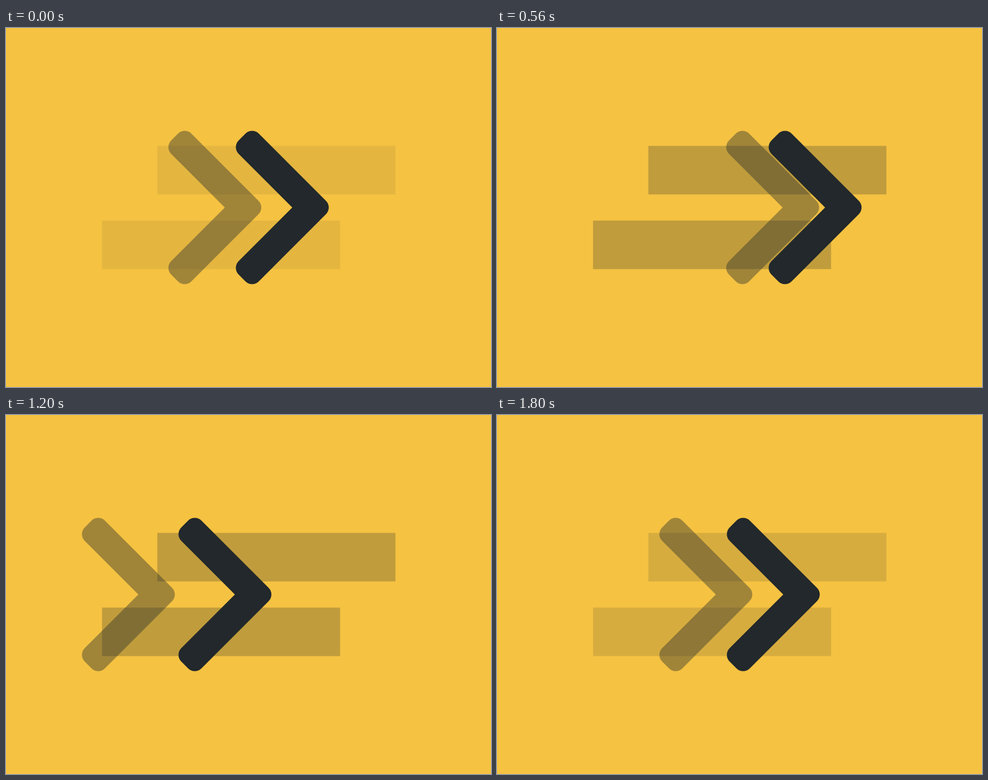
Recreate the animation shown at these times as an HTML page with a canvas. Size 870 by 644 pixels, loop 2 s.

```html
<!DOCTYPE html>
<html lang="en">
<head>
<meta charset="utf-8">
<title>Chevrons</title>
<style>
  html, body { margin: 0; width: 100%; height: 100%; overflow: hidden; background: #f5c242; }
  canvas { display: block; width: 870px; height: 644px; }
</style>
</head>
<body>
<canvas id="stage" width="870" height="644"></canvas>
<script>
const ctx = document.getElementById('stage').getContext('2d');
const LOOP = 2000, STEP = 40, REST = 1600, HOLD = 200;
const PAPER = '#f5c242', INK = '#22282b';

const clamp = v => Math.min(1, Math.max(0, v));
const span = (t, from, to) => clamp((t - from) / (to - from));
const mix = (a, b, p) => a + (b - a) * p;
const smooth = u => u * u * (3 - 2 * u);
const softSmooth = u => mix(u, smooth(u), 0.9);
const easeOut = (u, power) => 1 - Math.pow(1 - u, power);

const front = { x: 0, peak: 87.5, low: -105.5, power: 1.85, alpha: 1 };
const back = { x: -121, peak: 130, low: -159, power: 2.42, alpha: 0.4 };

// Glide right, swing back left, then settle at rest.
function shift(c, t) {
  if (t >= REST) return 0;
  if (t < 860) return c.peak * easeOut(span(t, 0, 860), c.power);
  if (t < 1220) return mix(c.peak, c.low, softSmooth(span(t, 860, 1220)));
  return c.low * (1 - smooth(span(t, 1230, 1620)));
}

function barAlpha(t) {
  return t < 1000
    ? mix(0.08, 0.25, span(t, 0, 400))
    : mix(0.25, 0.08, span(t, 1440, LOOP));
}

function drawBars(alpha) {
  ctx.globalAlpha = alpha;
  ctx.fillRect(271.5, 211.5, 427, 87);
  ctx.fillRect(172.3, 345.5, 427, 87);
}

function drawChevron(c, t) {
  const r = 17;
  ctx.save();
  ctx.translate(c.x + shift(c, t), 322);
  ctx.globalAlpha = c.alpha;
  ctx.beginPath();
  ctx.moveTo(513.5, 0);
  ctx.arcTo(405.25, -108.25, 441.5, -144.5, r);
  ctx.arcTo(441.5, -144.5, 586, 0, r);
  ctx.arcTo(586, 0, 441.5, 144.5, r);
  ctx.arcTo(441.5, 144.5, 405.25, 108.25, r);
  ctx.arcTo(405.25, 108.25, 513.5, 0, r);
  ctx.closePath();
  ctx.fill();
  ctx.restore();
}

function draw(now) {
  const time = now % LOOP;
  const step = time < REST ? STEP : HOLD;
  const t = Math.floor(time / step) * step;
  ctx.globalAlpha = 1;
  ctx.fillStyle = PAPER;
  ctx.fillRect(0, 0, 870, 644);
  ctx.fillStyle = INK;
  drawBars(barAlpha(t));
  drawChevron(back, t);
  drawChevron(front, t);
}

const start = performance.now();
function tick() {
  draw(performance.now() - start);
  requestAnimationFrame(tick);
}
tick();
</script>
</body>
</html>
```
